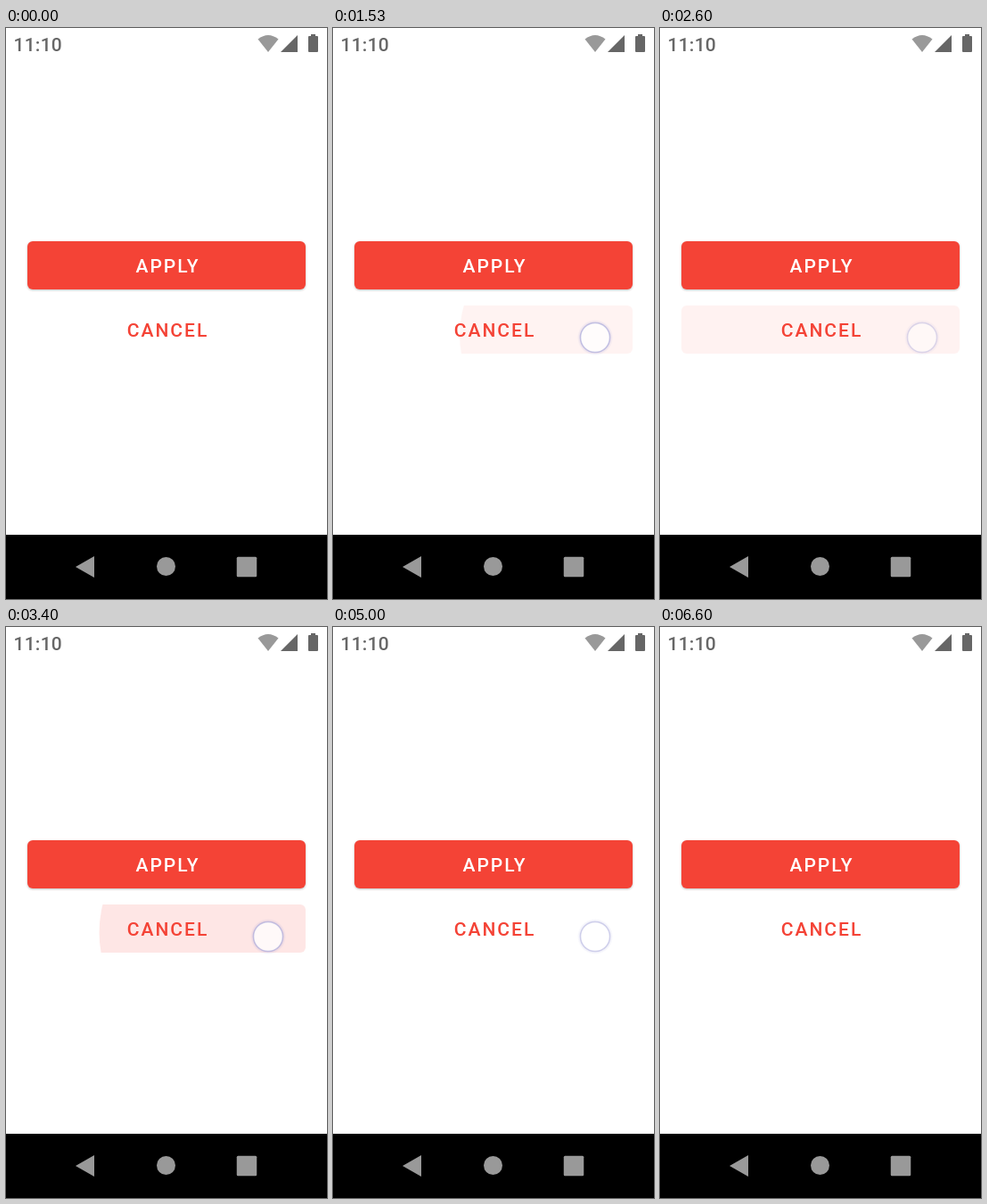
Recreate the animation shown at these times as an HTML page. Size 360 by 640 pixels, loop 6.99 s.

```html
<!DOCTYPE html>
<html lang="en">
<head>
<meta charset="utf-8">
<title>Button ripple</title>
<style>
  html, body { margin: 0; width: 100%; height: 100%; overflow: hidden; background: #fff; }
  svg { display: block; width: 360px; height: 640px; }
  text { font: 500 21px Roboto, sans-serif; }
  .label { letter-spacing: 2px; text-anchor: middle; }
  .clock { letter-spacing: .2px; fill: #666; }
  .apply { filter: drop-shadow(0 1px 1.2px rgba(0, 0, 0, .25)); }
</style>
</head>
<body>
<svg viewBox="0 0 360 640">
  <defs>
    <clipPath id="cancel"><rect x="24" y="311" width="312" height="54" rx="6"/></clipPath>
    <radialGradient id="halo">
      <stop offset=".8" stop-color="#8c8cd2" stop-opacity="0"/>
      <stop offset=".85" stop-color="#8c8cd2" stop-opacity=".2"/>
      <stop offset="1" stop-color="#8c8cd2" stop-opacity="0"/>
    </radialGradient>
  </defs>

  <!-- Status bar -->
  <text class="clock" x="8.6" y="26">11:10</text>
  <path d="M282.5 12.5Q294 3.5 305.5 12.5L294 27Z" fill="#999"/>
  <path d="M308 27L327 8V27Z" fill="#666"/>
  <path d="M342 7h5v2h2q1 0 1 1v16q0 1-1 1h-9q-1 0-1-1v-16q0-1 1-1h2z" fill="#666"/>

  <!-- Buttons -->
  <rect class="apply" x="24" y="239" width="312" height="54" rx="6" fill="#f44336"/>
  <text class="label" x="181.5" y="274" fill="#fff">APPLY</text>
  <g clip-path="url(#cancel)"><circle id="ripple" fill="#f44336" opacity="0"/></g>
  <text class="label" x="181.5" y="346" fill="#f44336">CANCEL</text>

  <g id="touch" opacity="0">
    <circle cx="294" cy="347" r="20" fill="url(#halo)"/>
    <circle cx="294" cy="347" r="16.5" fill="#fff" fill-opacity=".78" stroke="#a0a0d7" stroke-opacity=".6" stroke-width="1.5"/>
  </g>

  <!-- Navigation bar -->
  <rect y="568" width="360" height="72"/>
  <g fill="#999">
    <path d="M78 604L99 592V616Z"/>
    <circle cx="179.5" cy="603.5" r="10.5"/>
    <rect x="258.75" y="592.75" width="22.5" height="22.5" rx="1.5"/>
  </g>
</svg>
<script>
  const LOOP = 6990;
  const presses = [
    { down: 1467, up: 2521 },
    { down: 3319, up: 4320 },
    { down: 5005, up: 5990 }
  ];
  const ripple = document.getElementById('ripple');
  const touch = document.getElementById('touch');

  const clamp = v => Math.min(1, Math.max(0, v));
  const mix = (a, b, p) => a + (b - a) * p;

  // cubic-bezier(.4, 0, .2, 1), solved by bisection
  function ease(x) {
    let lo = 0, hi = 1, s = .5;
    for (let i = 0; i < 20; i++) {
      s = (lo + hi) / 2;
      const bx = 1.2 * s * (1 - s) ** 2 + .6 * s * s * (1 - s) + s ** 3;
      if (bx < x) lo = s; else hi = s;
    }
    return s * s * (3 - 2 * s);
  }

  function draw(t) {
    const { down, up } = presses.findLast(p => t >= p.down - 20) || presses[0];
    const age = t - down, gone = t - up;
    const spread = ease(clamp(age / 225));

    ripple.setAttribute('cx', mix(294, 180, spread));
    ripple.setAttribute('cy', mix(347, 338, spread));
    ripple.setAttribute('r', mix(94, 158.3, spread));
    ripple.setAttribute('opacity', .14 * clamp(age / 84) ** 3 * clamp(1 - gone / 150));
    touch.setAttribute('opacity', clamp((age + 20) / 20) * clamp(1 - gone / 200));
  }

  const start = performance.now();
  function tick() {
    draw((performance.now() - start) % LOOP);
    requestAnimationFrame(tick);
  }
  tick();
</script>
</body>
</html>
```
